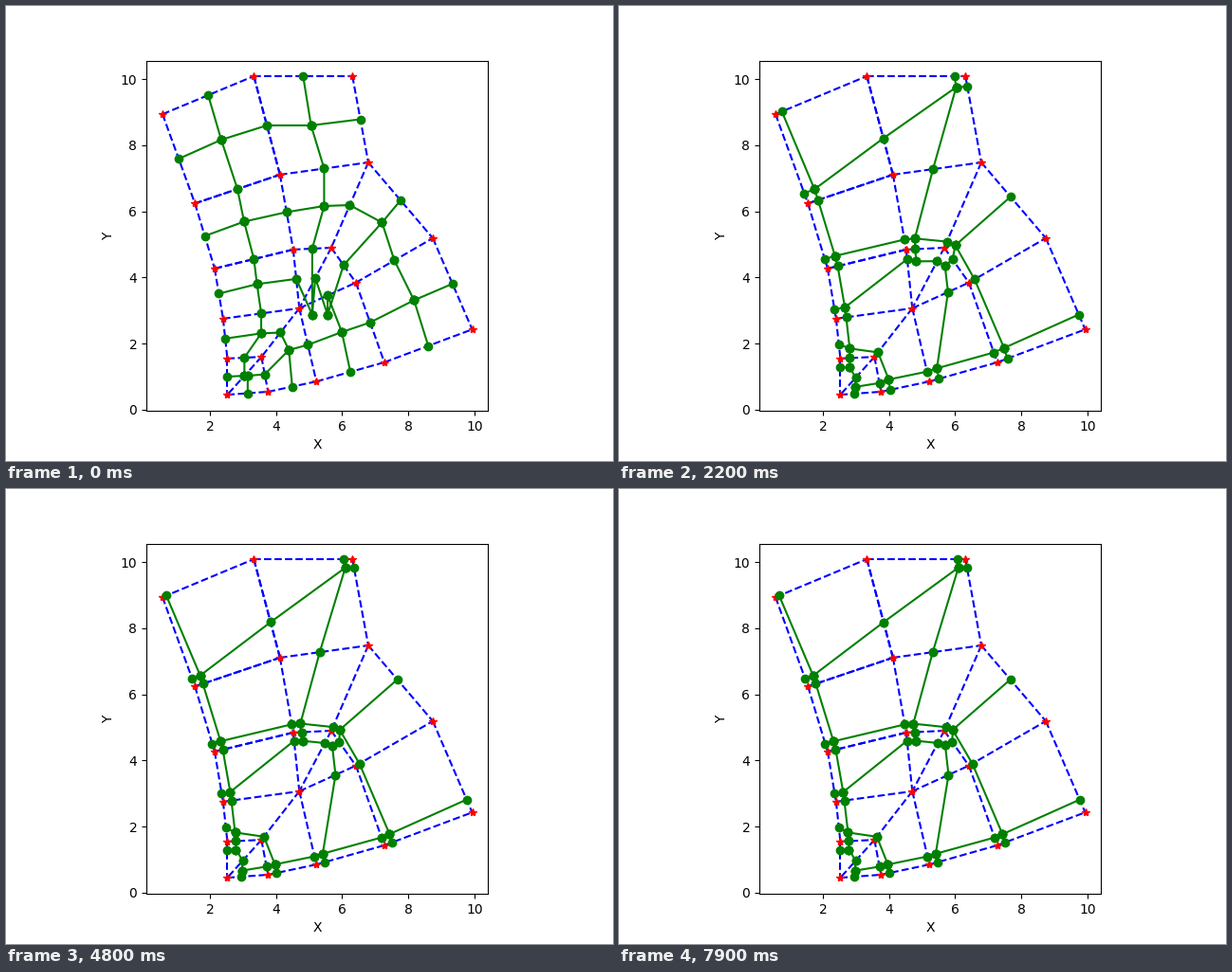
Animation, 640 px wide and 480 px high, one loop 8 s. Source, as a matplotlib script:

```python
import numpy as np
import matplotlib.pyplot as plt
from matplotlib.animation import FuncAnimation

STEPS, INTERVAL = 80, 100
SETTLE = 8          # steps in which the remaining way shrinks by a factor e
INSET = 0.26        # resting distance of a hub from its corner, along both sides

NODES = dict(
    A=(0.57, 8.94), B=(3.33, 10.09), C=(6.31, 10.09), D=(1.55, 6.24),
    E=(4.12, 7.11), F=(6.79, 7.48), G=(2.145, 4.27), H=(4.52, 4.845),
    I=(5.67, 4.90), J=(2.40, 2.755), K=(4.705, 3.07), L=(6.415, 3.845),
    M=(8.74, 5.19), N=(2.53, 1.55), O=(3.56, 1.60), P=(2.53, 0.455),
    Q=(3.76, 0.545), R=(5.22, 0.855), S=(7.275, 1.435), T=(9.93, 2.43))
NODES = {name: np.array(p) for name, p in NODES.items()}

# Each cell starts with the corner that attracts its hub.
CELLS = ("DEBA CBEF GDEH HEFI JGHK HIK ILK IFML NJKO NOP POQ "
         "QOKR RKLS SLMT").split()

# Resting place of the point on each edge, measured from the first node:
# as a distance, or as a share of the length.
REACH = {0.12: "AB IF LM OK",
         0.25: "CB CF DA DE GD HE GH HI JG HK JK NO NP QO QR RK SL RS ST",
         0.42: "IK IL NJ PQ TM"}
SHARE = {0.36: "EB LK", 0.45: "EF FM PO"}


def key(edge):
    return "".join(sorted(edge))


def ends(edge):
    return NODES[edge[0]], NODES[edge[1]]


def toward(a, b, distance):
    return a + (b - a) * distance / np.hypot(*(b - a))


def box_center(names):
    corners = np.array([NODES[n] for n in names])
    return (corners.min(axis=0) + corners.max(axis=0)) / 2


# Start and rest position of every edge point and hub.
start, rest = {}, {}
for reach, edges in REACH.items():
    for edge in edges.split():
        rest[key(edge)] = toward(*ends(edge), reach)
for share, edges in SHARE.items():
    for edge in edges.split():
        a, b = ends(edge)
        rest[key(edge)] = a + (b - a) * share
EDGES = sorted(rest)
for edge in EDGES:
    start[edge] = sum(ends(edge)) / 2
for cell in CELLS:
    # The boxes of the two triangles on edge IK also take in R.
    start[cell] = box_center(cell + "R" if cell in ("HIK", "ILK") else cell)
    corner, left, right = (NODES[cell[i]] for i in (0, 1, -1))
    rest[cell] = (toward(corner, left, INSET)
                  + toward(corner, right, INSET) - corner)


def web(step):
    """Spokes from each hub to the points on its sides, split by NaN."""
    left = np.exp(-step / SETTLE)
    at = {k: rest[k] + (start[k] - rest[k]) * left for k in rest}
    path = []
    for cell in CELLS:
        for side in zip(cell, cell[1:] + cell[0]):
            path += [at[cell], at[key(side)], (np.nan, np.nan)]
    return np.array(path).T


fig, ax = plt.subplots(figsize=(6.4, 4.8), dpi=100)
ax.set_aspect("equal")
ax.set_xlim(5.242 - 5.161, 5.242 + 5.161)
ax.set_ylim(5.262 - 5.298, 5.262 + 5.298)
ax.set_xlabel("X")
ax.set_ylabel("Y")

# Some inner edges are dashed from both ends.
for edge in EDGES + ["EB", "ED", "HG"]:
    ax.plot(*np.array(ends(edge)).T, "b--")
ax.plot(*np.array(list(NODES.values())).T, "r*")
mesh, = ax.plot(*web(0), "g-o")


def update(step):
    mesh.set_data(*web(step))
    return mesh,


anim = FuncAnimation(fig, update, frames=STEPS, interval=INTERVAL,
                     repeat=True, repeat_delay=0)
plt.show()
```
